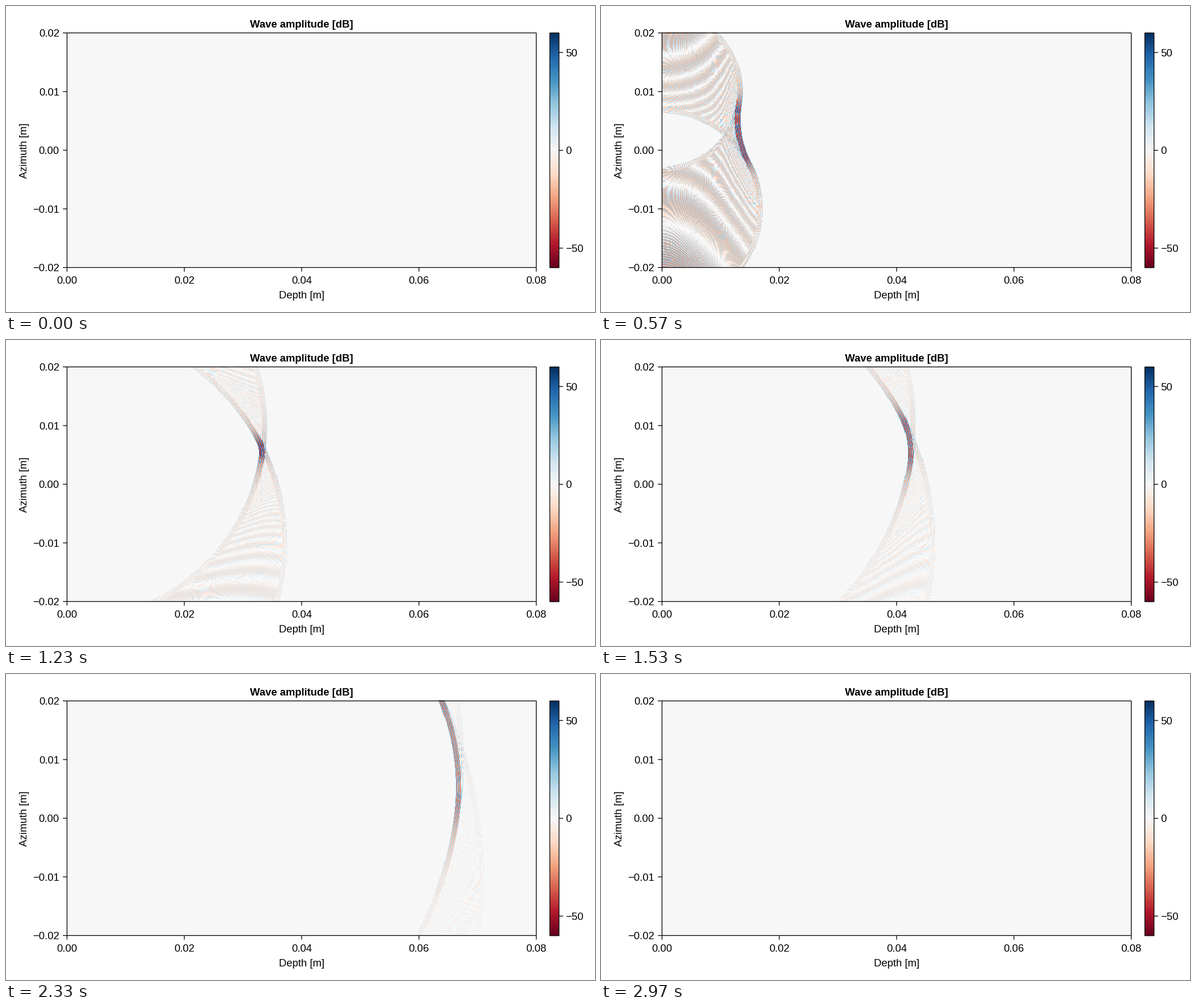
These frames come from a looping animation (1038 by 540 pixels, 3000 ms). A matplotlib script:

```python
import numpy as np
import matplotlib.pyplot as plt
from matplotlib.animation import FuncAnimation
from matplotlib.patches import Rectangle

W, H = 1038, 540
STEPS, TICK_MS, LOOP_MS = 90, 10, 3000
FONT = 18.5
LINE = 1.3
CMAP = plt.get_cmap("RdBu", 511)
LIMIT = 60                 # dB at both ends of the colour scale

# Plot area and colour bar, in pixels
LEFT, RIGHT, TOP, BOTTOM = 107.5, 934.5, 47.5, 461.5
BAR_L, BAR_R, BAR_T, BAR_B = 958.4, 974.6, 47.5, 461.8

# Medium, pulse and focused line array, in metres
CELL = 1e-4
NX, NY = 801, 401
STEP = 0.001015            # distance travelled per step
START = -0.0001
WAVELENGTH = 0.000308
PULSE = 3 * WAVELENGTH
GAIN = 0.16
FOCUS_X, FOCUS_Y = 0.0285, 0.0052
ELEMENTS = np.arange(100, 301, 2)   # grid rows of the elements

elem_y = (ELEMENTS - 200) * CELL
to_focus = np.hypot(FOCUS_X, FOCUS_Y - elem_y)
delays = to_focus.max() - to_focus

# Distances from one element, sorted so that a pulse is one slice
SPAN = 300
dy, dx = np.mgrid[-SPAN:SPAN + 1, 0:NX]
dist = (np.hypot(dx, dy) * CELL).ravel()
order = np.argsort(dist)
dist = dist[order]
weight = GAIN / np.maximum(dist, CELL)
PAD = SPAN - ELEMENTS[0]


def wave_db(step):
    """Signed level of the summed element pulses."""
    field = np.zeros((2 * SPAN + 1 + ELEMENTS[-1] - ELEMENTS[0]) * NX)
    for row, delay in zip(ELEMENTS, delays):
        reach = START + STEP * step - delay
        if reach <= 0:
            continue
        a, b = np.searchsorted(dist, [reach - PULSE, reach])
        phase = 2 * np.pi / WAVELENGTH * (reach - dist[a:b])
        cells = order[a:b] + (row - ELEMENTS[0]) * NX
        field[cells] += np.cos(phase) * weight[a:b]
    field = field.reshape(-1, NX)[PAD:PAD + NY]
    return np.sign(field) * 20 * np.log10(np.maximum(np.abs(field), 1))


def colours(db):
    return CMAP((db + LIMIT) / (2 * LIMIT), bytes=True)


pictures = [colours(wave_db(step)) for step in range(STEPS)]

fig = plt.figure(figsize=(W / 72, H / 72), dpi=72, facecolor="white")
ax = fig.add_axes([0, 0, 1, 1])
ax.axis("off")


def label(x, y, text, ha="center", **kw):
    ax.text(x, y, text, ha=ha, va="baseline", fontsize=FONT,
            family="Liberation Sans", color="black", **kw)


def tick(xs, ys):
    ax.plot(xs, ys, color="black", lw=LINE, solid_capstyle="butt", snap=False)


def frame_box(x0, y0, x1, y1):
    ax.add_patch(Rectangle((x0, y0), x1 - x0, y1 - y0, fill=False,
                           ec="black", lw=LINE, snap=False, zorder=3))


def raster(pixels, left, right, bottom, top):
    return ax.imshow(pixels, origin="lower", aspect="auto",
                     interpolation="nearest",
                     extent=(left, right, bottom, top))


def signed(value, digits):
    return f"{value:.{digits}f}".replace("-", "\u2212")


half_x = (RIGHT - LEFT) / (NX - 1) / 2
half_y = (BOTTOM - TOP) / (NY - 1) / 2
image = raster(pictures[0], LEFT - half_x, RIGHT + half_x,
               BOTTOM + half_y, TOP - half_y)
raster(colours(np.linspace(-LIMIT, LIMIT, 512)[:, None]),
       BAR_L, BAR_R, BAR_B, BAR_T)
ax.set_xlim(0, W)
ax.set_ylim(H, 0)

frame_box(LEFT, TOP, RIGHT, BOTTOM)
frame_box(BAR_L, BAR_T, BAR_R, BAR_B)

for i in range(5):
    x = LEFT + (RIGHT - LEFT) * i / 4
    tick([x, x], [BOTTOM, BOTTOM + 7.2])
    label(x, 490.2, signed(0.02 * i, 2))

    y = TOP + (BOTTOM - TOP) * i / 4
    tick([LEFT - 7.2, LEFT], [y, y])
    label(94, y + 6.7, signed((2 - i) / 100, 2), ha="right")

for value in (-50, 0, 50):
    y = (BAR_T + BAR_B) / 2 - value / (2 * LIMIT) * (BAR_B - BAR_T)
    tick([BAR_R, BAR_R + 7.2], [y, y])
    label(986.5, y + 6.7, signed(value, 0), ha="left")

label(521, 38.4, "Wave amplitude [dB]", weight="bold")
label(521, 515.8, "Depth [m]")
label(37.2, 254.8, "Azimuth [m]", rotation=90, rotation_mode="anchor")


def update(frame):
    # 30 steps a second, each starting on the nearest 10 ms tick
    image.set_data(pictures[(3 * frame + 1) // 10])
    return [image]


anim = FuncAnimation(fig, update, frames=LOOP_MS // TICK_MS, interval=TICK_MS,
                     init_func=lambda: update(0), repeat=True,
                     repeat_delay=0, blit=False)
plt.show()
```
